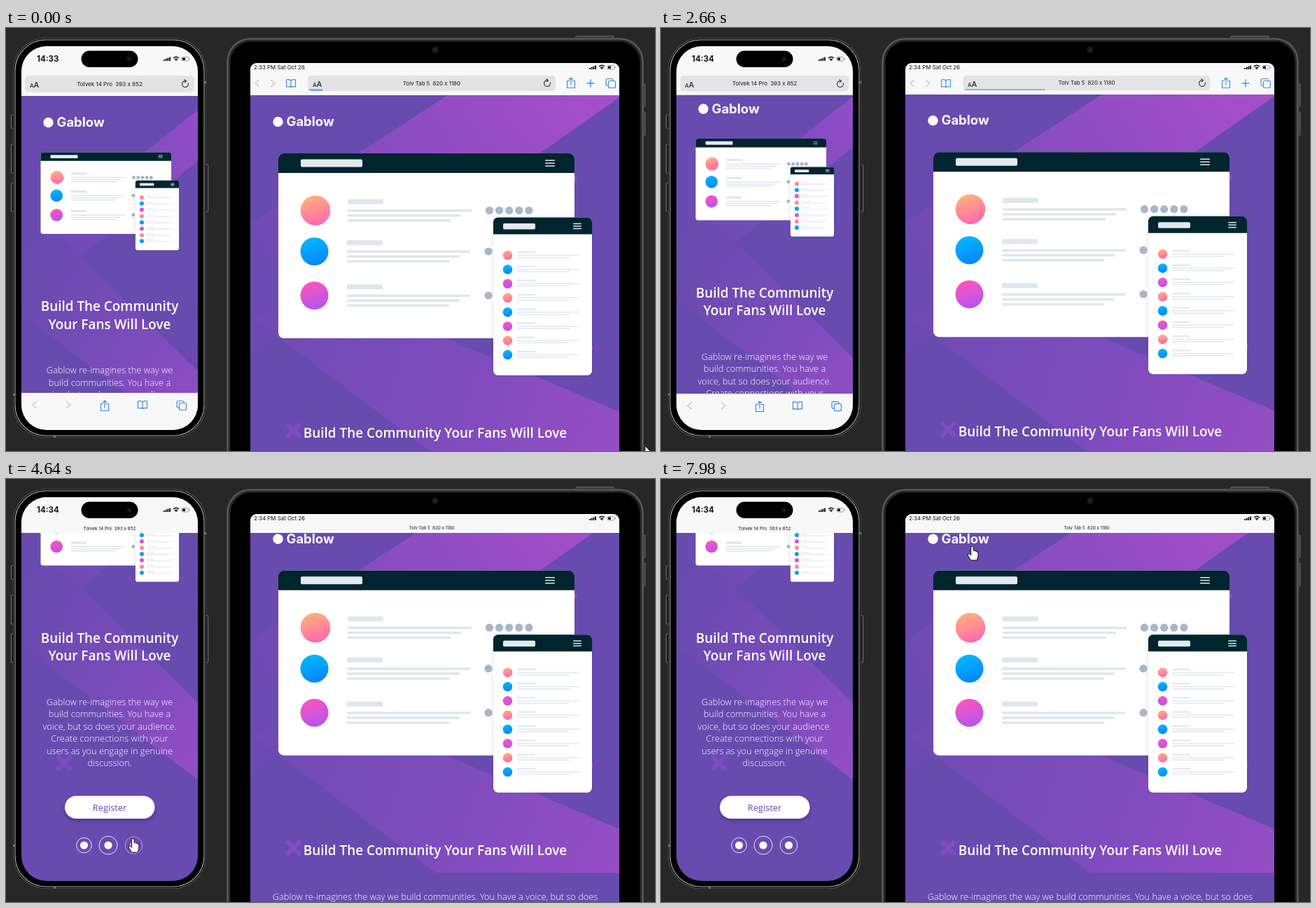
An HTML page with a canvas that plays this animation: 927 by 604 pixels, repeating every 8000 ms.

```html
<!DOCTYPE html>
<html lang="en">
<head>
<meta charset="utf-8">
<title>Responsive preview</title>
<style>
html, body { margin: 0; width: 100%; height: 100%; overflow: hidden; background: #272728; }
canvas { display: block; }
</style>
</head>
<body>
<canvas id="stage" width="927" height="604"></canvas>
<script>
const ctx = document.getElementById('stage').getContext('2d');
const LOOP = 8000;
const BASE = '#674baf', BLUE = '#3d8ae6', PINK = '#e882e8', BAR = '#f8f8f8', INK = '#111';
const SANS = '"Open Sans", sans-serif', UI = 'Inter, sans-serif';
const BRAND = 'Gablow', PHONE = 'Tolvek 14 Pro  393 x 852', TABLET = 'Tolv Tab 5  820 x 1180';
const COPY = [BRAND + ' re-imagines the way we', 'build communities. You have a',
  'voice, but so does your audience.', 'Create connections with your',
  'users as you engage in genuine', 'discussion.'];
const DOTS = [['#ffb17a', '#ff66b0'], ['#00b8fa', '#0a84ff'], ['#ff55bd', '#b055f0']];

// Keyed motion: each key is [time, value, ...]
const CURSOR = [[0, 913, 597], [70, 900, 570], [300, 640, 260], [560, 360, 36], [840, 197, 118],
  [1050, 120, 136], [1190, 115, 134], [1470, 117, 138], [1680, 130, 175], [1960, 142, 270],
  [2450, 152, 400], [3190, 152, 400], [3500, 148, 440], [3800, 157, 473], [4100, 158, 474],
  [4420, 174, 494], [4720, 184, 520], [4980, 180, 522], [5260, 148, 521], [5540, 127, 522],
  [5750, 114, 521], [5900, 120, 505], [6100, 172, 465], [6430, 293, 274], [6800, 365, 180],
  [7060, 438, 83], [7200, 443, 86], [7320, 428, 112], [7580, 455, 122], [7800, 455, 122],
  [7980, 444.5, 96]];
const PHONE_SCROLL = [[2520, 0], [2590, 4], [2660, 18.5], [2730, 85], [2800, 148], [2870, 166], [2930, 170.5]];
const TABLET_SCROLL = [[2590, 0], [2660, 1.5], [2730, 22], [2800, 46], [2930, 48.3]];
const COLLAPSE = [[2590, 0], [2660, 0.05], [2730, 0.5], [2800, 1]];
const DOCK = [[2600, 0], [2660, 1], [2800, 27], [2930, 54]];

function keyed(keys, t) {
  const i = keys.findIndex(k => k[0] > t);
  if (i === 0) return keys[0].slice(1);
  if (i < 0) return keys[keys.length - 1].slice(1);
  const a = keys[i - 1], b = keys[i], f = (t - a[0]) / (b[0] - a[0]);
  return a.slice(1).map((v, j) => v + (b[j + 1] - v) * f);
}

function shape(path, fill, stroke, width = 1) {
  if (fill) { ctx.fillStyle = fill; ctx.fill(path); }
  if (stroke) { ctx.strokeStyle = stroke; ctx.lineWidth = width; ctx.stroke(path); }
}
function rect(x, y, w, h, r, fill, stroke, width) {
  const p = new Path2D();
  p.roundRect(x, y, w, h, r);
  shape(p, fill, stroke, width);
}
function disc(x, y, r, fill, stroke, width) {
  const p = new Path2D();
  p.arc(x, y, r, 0, 7);
  shape(p, fill, stroke, width);
}
function poly(fill, ...points) {
  shape(new Path2D('M' + points.join('L') + 'Z'), fill);
}
function fade(x0, y0, x1, y1, ...colors) {
  const g = ctx.createLinearGradient(x0, y0, x1, y1);
  colors.forEach((c, i) => g.addColorStop(i / (colors.length - 1), c));
  return g;
}
function text(s, x, y, font, color, align = 'left') {
  ctx.font = font;
  ctx.fillStyle = color;
  ctx.textAlign = align;
  ctx.fillText(s, x, y);
}
function at(x, y, draw, scale = 1) {
  ctx.save();
  ctx.translate(x, y);
  ctx.scale(scale, scale);
  draw();
  ctx.restore();
}
function icon(x, y, d, color, width = 1.2) {
  at(x, y, () => shape(new Path2D(d), null, color, width));
}

const back = (x, y) => icon(x, y, 'M3-5L-3 0L3 5', '#c4c4c8');
const next = (x, y) => icon(x, y, 'M-3-5L3 0L-3 5', '#c4c4c8');
const share = (x, y) => icon(x, y, 'M-2-3H-5.5V7H5.5V-3H2M0 3V-7.5M-3-4.5L0-7.5L3-4.5', BLUE);
const book = (x, y) => icon(x, y, 'M0-4Q-3-6-6.5-5V5Q-3 4 0 5.5Q3 4 6.5 5V-5Q3-6 0-4V5', BLUE);
const plus = (x, y) => icon(x, y, 'M-5.5 0H5.5M0-5.5V5.5', BLUE, 1.3);
function tabs(x, y) {
  rect(x - 7, y - 6.5, 10, 9.5, 2, null, BLUE, 1.2);
  rect(x - 3.5, y - 3.5, 10, 10, 2, BAR, BLUE, 1.2);
}
function reload(x, y) {
  icon(x, y, 'M4.3-1.5A4.5 4.5 0 1 1 1-4.4M-1.5-6.5L1.5-4.3L-1-2', '#333');
}
function letters(x, y) {
  text('A', x, y, '500 8px ' + UI, '#222');
  text('A', x + 5.5, y, '500 11px ' + UI, '#222');
}
function signals(x, y) {
  for (let i = 0; i < 4; i++) rect(x + i * 2.7, y + 1 - i * 1.2, 1.9, 2 + i * 1.2, 0.5, INK);
  icon(x + 18, y + 2, 'M-4-3Q0-6.5 4-3M-2.3-.8Q0-3 2.3-.8', INK, 1.3);
  disc(x + 18, y + 2, 1, INK);
  rect(x + 26, y - 2.5, 10, 5.5, 1.8, null, '#888', 0.8);
  rect(x + 27, y - 1.5, 4, 3.5, 0.8, INK);
  rect(x + 36.8, y - 1, 1, 2.4, 0.5, '#999');
}

function menu(x, y, w, gap) {
  for (let i = -1; i < 2; i++) rect(x, y + i * gap - 0.7, w, 1.5, 0.7, '#dfe5ea');
}
function avatar(x, y, r, i) {
  disc(x, y, r, fade(x - r * 0.3, y - r, x + r * 0.3, y + r, ...DOTS[i % 3]));
}

// Mock-up window; the origin is its top left corner
function mockup() {
  disc(421, 36, 5, '#a44dc2');
  disc(436, 278, 13, '#b34fc4');
  rect(0, 0, 423, 264, 8, '#fff');
  rect(0, 0, 423, 28, [8, 8, 0, 0], '#00252e');
  rect(32, 8.5, 88, 11, 2, '#e3e9ef');
  menu(381, 14, 14, 4);
  [81.5, 140, 203].forEach((y, i) => {
    const x = i ? 98 : 99;
    avatar(i ? 51.5 : 53, y, i ? 20 : 21.3, i);
    rect(x, y - 16, 51, 7, 1, '#dfe6ed');
    [177, 162, 147].forEach((w, j) => rect(x, y - 1.5 + j * 7, w - (i ? 1 : 0), 3.5, 1, '#dfe6ed'));
    for (let j = 0; j < (i ? 1 : 5); j++) disc((i ? 300 : 301.5) + j * 14.1, y, 5.6, '#a9b6ca');
  });
  ctx.save();
  ctx.shadowColor = 'rgba(30,40,70,.18)';
  ctx.shadowBlur = 5;
  rect(307, 91.5, 141, 225.5, 7, '#fff');
  ctx.restore();
  rect(307, 91.5, 141, 24, [7, 7, 0, 0], '#00252e');
  rect(321, 100, 46, 8.5, 2, '#e3e9ef');
  menu(421, 104, 12, 3.5);
  for (let i = 0; i < 8; i++) {
    const y = 145.5 + i * 20.3;
    avatar(327.5, y, 6.8, i);
    rect(341, y - 5.5, 26, 2.2, 0.5, '#e2e8ee');
    rect(341, y - 0.8, 89, 1.5, 0.5, '#e2e8ee');
    rect(341, y + 2.5, 75, 1.5, 0.5, '#e2e8ee');
  }
}

function logo(x, y) {
  disc(x + 8.5, y - 6, 7.2, '#fff');
  text(BRAND, x + 20.5, y, '700 18.5px ' + UI, '#fff');
}
const cross = (x, y, c) => icon(x, y, 'M-10-10L10 10M10-10L-10 10', c, 6.5);

const inside = (c, x, y, w, h) => c[0] >= x && c[0] <= x + w && c[1] >= y && c[1] <= y + h;

function phonePage(scroll, cur) {
  const local = [cur[0], cur[1] + scroll];
  rect(22, 0, 252, 800, 0, BASE);
  poly(fade(274, 120, 40, 330, '#944dc7', '#7a4cbc', '#6a4bb0'), [274, 117], [274, 190], [22, 395], [22, 318]);
  poly(fade(22, 380, 274, 560, '#6a4bb0', '#784cba', '#924dc5'), [22, 318], [80, 300], [274, 490], [274, 600], [22, 408]);
  logo(52, 141);
  at(49.5, 177.5, mockup, 0.441);
  cross(83, 576, '#7c4cbd');
  text('Build The Community', 148, 404, '600 18.9px ' + SANS, '#fff', 'center');
  text('Your Fans Will Love', 148, 429.7, '600 18.9px ' + SANS, '#fff', 'center');
  COPY.forEach((s, i) => text(s, 148, 493 + i * 17.55, '300 12.8px ' + SANS, '#fff', 'center'));
  const hot = inside(local, 84, 623, 128.5, 32.5);
  ctx.save();
  ctx.shadowColor = 'rgba(30,15,70,.35)';
  ctx.shadowBlur = 6;
  ctx.shadowOffsetY = 3;
  rect(84, 623, 128.5, 32.5, 16.2, hot ? PINK : '#fff');
  ctx.restore();
  text('Register', 148, 644, '400 12.8px ' + SANS, hot ? '#fff' : BASE, 'center');
  [[111.5, 10.8], [146, 13], [182.5, 12.3]].forEach(([x, r]) => {
    const over = Math.hypot(local[0] - x, local[1] - 693.5) < r;
    disc(x, 693.5, r, null, over ? PINK : '#e9e2f6', 1);
    disc(x, 693.5, 5.6, over ? PINK : '#fff');
  });
}

function tabletPage() {
  rect(349, 0, 527, 700, 0, BASE);
  poly(fade(850, 96, 400, 400, '#a64ec9', '#8b4dc2', '#6b4bb1'),
    [640, 90], [876, 90], [876, 99], [349, 470], [349, 279]);
  poly(fade(380, 430, 876, 590, '#704bb5', '#7c4cbd', '#964dc6'),
    [349, 412], [480, 380], [876, 548], [876, 610.5], [614, 610.5]);
  logo(380, 140);
  at(389, 179, mockup);
  cross(410.5, 575, '#814cbd');
  text('Build The Community Your Fans Will Love', 613, 585, '600 18.9px ' + SANS, '#fff', 'center');
  text(COPY[0] + ' build communities. You have a voice, but so does', 613, 649.5, '300 12.8px ' + SANS, '#fff', 'center');
}

function clipped(x, y, w, h, r, draw) {
  ctx.save();
  ctx.beginPath();
  ctx.roundRect(x, y, w, h, r);
  ctx.clip();
  draw();
  ctx.restore();
}

function phone(t, cur) {
  const [fold] = keyed(COLLAPSE, t), [scroll] = keyed(PHONE_SCROLL, t), [drop] = keyed(DOCK, t);
  for (const [y, h] of [[124, 19], [166, 41], [221, 41]]) rect(7.5, y, 5, h, 1, '#151515', '#77777a', 1);
  rect(283, 195, 5.5, 67, 1, '#151515', '#77777a', 1);
  rect(10, 14, 276, 571, 47, '#58585a');
  rect(11.2, 15.2, 273.6, 568.6, 46, '#131313', '#111', 1);
  rect(13, 17, 270, 565, 44, '#000', '#a3a3a6', 1.1);
  rect(68, 582, 3, 3, 0, '#777');
  rect(10, 522, 3, 3, 0, '#777');
  rect(283, 76, 3, 3, 0, '#777');
  clipped(22, 26, 252, 548, 36, () => {
    at(0, -scroll, () => phonePage(scroll, cur));
    const base = 97 - 20 * fold;
    rect(22, 26, 252, base - 26, 0, BAR);
    ctx.globalAlpha = 1 - fold;
    rect(27 + fold * 10, 68, 242 - fold * 20, 23.5 - 18 * fold, 5, '#e3e3e5');
    letters(34, 84.5);
    reload(256, 80);
    ctx.globalAlpha = 1;
    text(PHONE, 148, 83 - 10.5 * fold, `500 ${8 - 1.6 * fold}px ` + UI, '#333', 'center');
    text(t < 2590 ? '14:33' : '14:34', 44, 48, '700 11.5px ' + UI, INK);
    rect(107.5, 32.5, 81, 23.5, 11.8, '#000');
    disc(176, 44.3, 4, '#0b0c18');
    disc(176, 44.3, 1.6, '#1c2147');
    signals(225, 44);
    at(0, drop, () => {
      rect(22, 521, 252, 60, 0, BAR);
      back(41, 538);
      next(89, 538);
      share(141, 539.5);
      book(195, 538);
      tabs(251, 539);
    });
  });
}

function tablet(t) {
  const [fold] = keyed(COLLAPSE, t), [scroll] = keyed(TABLET_SCROLL, t);
  rect(814, 11.5, 54, 5, 1, '#3a3a3c', '#6a6a6d', 1);
  rect(908, 80, 5, 32, 1, '#3a3a3c', '#6a6a6d', 1);
  rect(908, 120, 5, 33, 1, '#3a3a3c', '#6a6a6d', 1);
  rect(315, 14, 596, 680, 34, '#4b4b4e');
  rect(317, 16, 592, 680, 32, '#28282a', '#68686b', 1.2);
  rect(320.5, 19.5, 585, 680, 29, '#000');
  disc(613, 31, 5, '#15161a');
  disc(613, 31, 2, '#24273a');
  clipped(349, 50, 527, 600, 9, () => {
    at(0, -scroll, tabletPage);
    const base = 96 - 19 * fold;
    rect(349, 50, 527, base - 50, 0, BAR);
    ctx.globalAlpha = 1 - fold;
    back(359, 79);
    next(381, 79);
    book(407, 79);
    clipped(431 + fold * 10, 68, 354 - fold * 20, 22 - 16 * fold, 5, () => {
      rect(431, 68, 354, 22, 0, '#e3e3e5');
      const load = Math.min(346, 172 * ((t + 110) % 2100) / 1000);
      rect(433, 87.3, load, 3, 0, '#6aa8f0');
    });
    letters(438, 83.5);
    reload(773, 79);
    share(807, 78.5);
    plus(835, 79);
    tabs(864, 79);
    ctx.globalAlpha = 1;
    text(TABLET, 608, 82 - 9.7 * fold, `500 ${7.8 - 1.6 * fold}px ` + UI, '#333', 'center');
    text(`2:${t < 2590 ? 33 : 34} PM Sat Oct 26`, 354, 59, '400 7.9px ' + UI, INK);
    signals(833, 56);
  });
}

const ARROW = new Path2D('M0 0V16L3.8 12.6L6.3 18.4L8.8 17.3L6.3 11.6H11.4Z');
const HAND = new Path2D('M-1.8 1.5Q0-1 1.8 1.5V6.5Q3.5 5.3 4.3 7Q6 6 6.5 8Q8.5 7.4 8.5 10V14Q8.3 17 6.5 20H-2L-6 13Q-6.8 10-4.3 10.6L-1.8 13Z');
const BEAM = new Path2D('M-2.5-6H2.5M0-6V7M-2.5 7H2.5');

function pointer(t, c) {
  const scrolled = t > 2900;
  const hand = inside(c, 50, 124, 94, 22) && !scrolled
    || scrolled && (inside(c, 84, 452, 128, 33) || inside(c, 379, 77, 92, 22)
      || [111.5, 146, 182.5].some(x => Math.hypot(c[0] - x, c[1] - 523) < 12));
  const beam = !hand && (scrolled ? inside(c, 50, 310, 196, 105) : inside(c, 50, 385, 196, 50));
  at(c[0], c[1], () => {
    ctx.lineJoin = 'round';
    if (beam) shape(BEAM, null, '#594a78', 1);
    else shape(hand ? HAND : ARROW, '#fff', '#111', 1);
  });
}

function frame(now) {
  const t = now % LOOP, cur = keyed(CURSOR, t);
  rect(0, 0, 927, 604, 0, '#272728');
  phone(t, cur);
  tablet(t);
  pointer(t, cur);
  requestAnimationFrame(frame);
}
requestAnimationFrame(frame);
</script>
</body>
</html>
```
